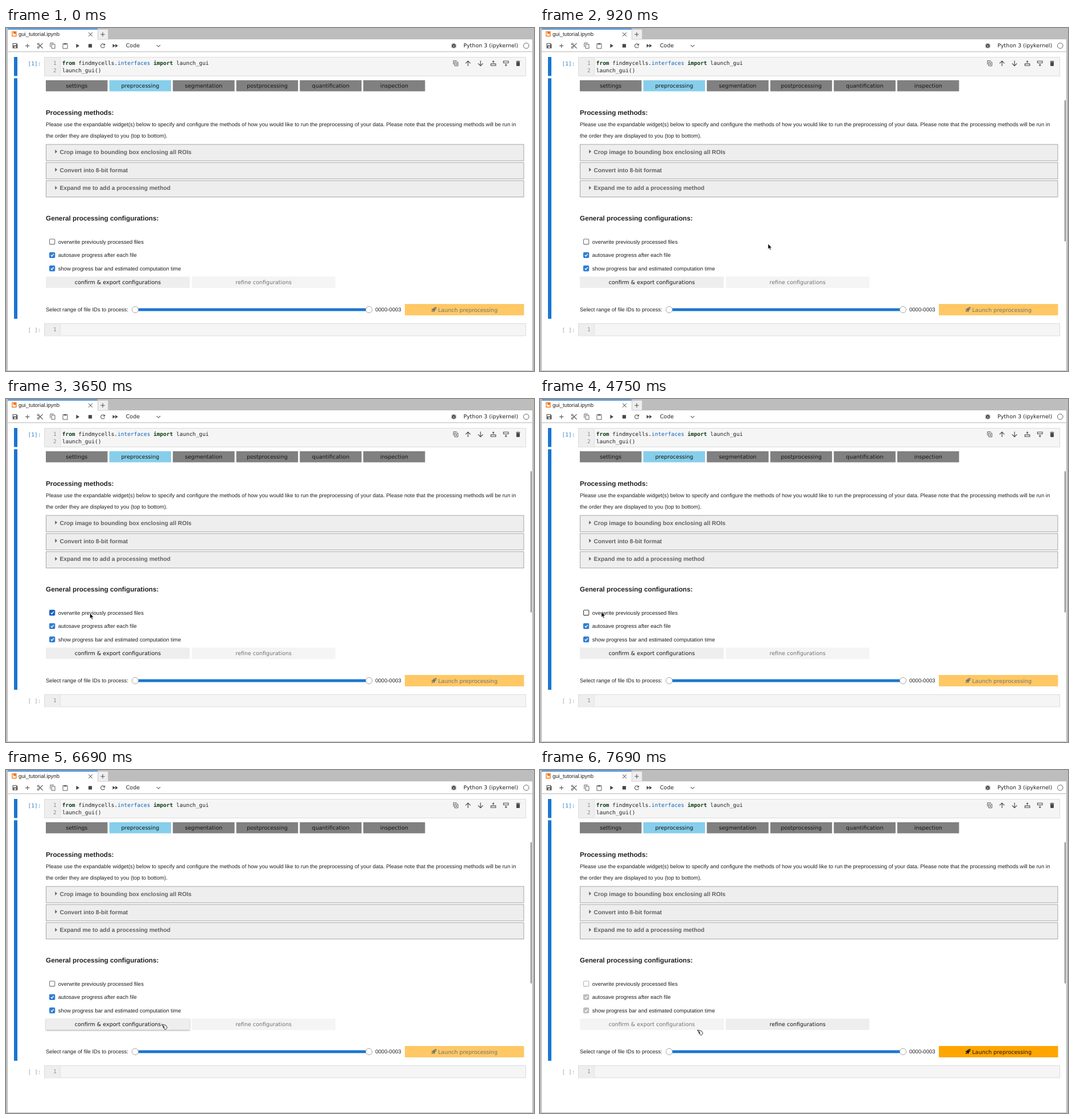
Animation of 928 by 604 pixels, one loop 8 s. Source, as an HTML page:

```html
<!DOCTYPE html>
<html lang="en">
<head>
<meta charset="utf-8">
<title>Notebook preprocessing</title>
<style>
html, body { margin: 0; width: 100%; height: 100%; overflow: hidden; background: #bdbdbd; }
svg { display: block; width: 928px; height: 604px; text-rendering: geometricPrecision; }
text { font: 9.53px "Liberation Sans", Arial, sans-serif; fill: #212121; white-space: pre; }
.ui { font-family: "DejaVu Sans", sans-serif; }
.mid { text-anchor: middle; }
.code { font-family: "DejaVu Sans Mono", monospace; }
.b10 { font-size: 10.27px; font-weight: bold; }
.b12 { font-size: 11.75px; font-weight: bold; }
.key { fill: #0b3a12; font-weight: bold; }
.lift { filter: drop-shadow(0 1px 1px rgba(0,0,0,.38)); }
.press { filter: drop-shadow(0 2px 2px rgba(0,0,0,.5)); }
</style>
</head>
<body>
<svg id="stage" viewBox="0 0 928 604" xmlns="http://www.w3.org/2000/svg"></svg>
<script>
const BLUE = '#1976d2', GREY = '#616161', DARK = '#484848';
const stage = document.getElementById('stage');

const rect = (x, y, w, h, fill, extra = '') =>
  `<rect x="${x}" y="${y}" width="${w}" height="${h}" fill="${fill}" ${extra}/>`;
const text = (x, y, str, cls = '', fill = '') =>
  `<text x="${x}" y="${y}" class="${cls}" ${fill && `style="fill:${fill}"`}>${str}</text>`;
const at = (x, y, body, extra = '') => `<g transform="translate(${x} ${y})" ${extra}>${body}</g>`;
const solid = (d, fill = GREY) => `<path d="${d}" fill="${fill}" fill-rule="evenodd"/>`;
const line = (d, color = GREY, w = 1.2) =>
  `<path d="${d}" fill="none" stroke="${color}" stroke-width="${w}"/>`;

function frame() {
  return rect(0, 0, 928, 604, '#bdbdbd')
    + rect(3, 20, 922, 583, '#fff')
    + rect(3, 1, 158, 20, '#fff') + rect(3, 1, 158, 1.6, BLUE)
    + rect(161.5, 2.5, 18, 17.5, '#eee', 'stroke="#c8c8c8" stroke-width=".8"')
    + rect(3, 41, 922, 1, '#c6c6c6') + rect(3, 42, 922, 1, '#ececec')
    + at(10, 6, line('M.9 .6H8V8.4H.9Z', '#ef6c00', 1.2) + solid('M3.2 1H7V5.2L5.1 3.8 3.2 5.2Z', '#ef6c00'))
    + text(22, 13.7, 'gui_tutorial.ipynb')
    + at(148.5, 11.3, line('M-3.4-3.4L3.4 3.4M3.4-3.4L-3.4 3.4', '#333', 1))
    + at(170, 11.3, line('M-3.7 0H3.7M0-3.7V3.7', '#555', 1.1));
}

function toolbar() {
  const icon = (x, body) => at(x, 31.3, body);
  return icon(16, solid('M-4.5-4.5H2.5L4.5-2.5V4.5H-4.5ZM-3.3-3.3V-.8H1.8V-3.3ZM0 .6a1.5 1.5 0 1 0 .01 0Z'))
    + icon(37.7, line('M-3.6 0H3.6M0-3.6V3.6'))
    + icon(60, line('M-2.2-2L4.6 4.4M-2.2 2L4.6-4.4', GREY, 1.3)
        + '<g fill="none" stroke="#616161" stroke-width="1.1"><circle cx="-3.3" cy="-3" r="1.5"/><circle cx="-3.3" cy="3" r="1.5"/></g>')
    + icon(82, line('M-1.8-2.6H4V4.7H-1.8ZM-4.2 2.4V-4.9H2', GREY, 1))
    + icon(104, line('M-4-3.8H4V4.8H-4Z', GREY, 1) + solid('M-2.4-4.2H-1.2A1.3 1.3 0 0 1 1.2-4.2H2.4V-2H-2.4Z'))
    + icon(126, solid('M-2.6-3.6L3 0-2.6 3.6Z', DARK))
    + icon(148, rect(-3.1, -3.1, 6.2, 6.2, DARK))
    + icon(170, line('M2.6-2.3A3.5 3.5 0 1 0 3.4 1', GREY, 1.2) + solid('M4.1-4.3V-.5H.3Z'))
    + icon(192, solid('M-4.5-3.2L0 0-4.5 3.2ZM.2-3.2L4.7 0 .2 3.2Z', DARK))
    + text(210.7, 34.3, 'Code', 'ui')
    + icon(268, line('M-3.2-1.3L0 1.8 3.2-1.3', GREY, 1.1))
    + icon(787, solid('M-2.2-2.2A2.3 2.3 0 0 1 2.2-2.2H4.2V-1.2H2.9V-.3H4.2V.8H2.9V1.7H4.2V2.7H2.4A2.7 2.7 0 0 1-2.4 2.7H-4.2V1.7H-2.9V.8H-4.2V-.3H-2.9V-1.2H-4.2V-2.2ZM-1.2-.9V0H1.2V-.9ZM-1.2 1.2V2.1H1.2V1.2Z', DARK)
        + line('M-2.5-4.4L-1.2-3M2.5-4.4L1.2-3', DARK, 1))
    + text(804, 34.3, 'Python 3 (ipykernel)', 'ui')
    + '<circle id="kernel" cx="914.3" cy="31.2" r="4.8" fill="#fff" stroke="#616161"/>';
}

function cell(y, h, prompt, color) {
  return rect(67.5, y, 846, h, '#f5f5f5', 'stroke="#dcdcdc"')
    + rect(68, y + .5, 27, h - 1, '#eee') + rect(95, y + .5, .8, h - 1, '#ddd')
    + text(38.5, y + 14.2, prompt, 'code', color)
    + text(83, y + 13.5, '1', 'code', '#8c8c8c');
}

function cells() {
  const icon = (x, body) => at(x, 62.3, body);
  const insert = 'M-4.3 .8H4.3V4H-4.3ZM0-.8V-5M-2-3H2';
  return rect(14, 51, 6, 33.5, BLUE) + rect(14, 88.5, 6, 423.5, BLUE)
    + cell(51.5, 33, '[1]:', '#307fc1') + cell(520.5, 21.5, '[ ]:', '#9e9e9e')
    + text(83, 77.8, '2', 'code', '#8c8c8c')
    + text(98.7, 65, '<tspan class="key">from</tspan> findmycells.<tspan fill="#0a63b5">interfaces</tspan> <tspan class="key">import</tspan> launch_gui', 'code')
    + text(98.7, 77.9, 'launch_gui()', 'code')
    + icon(790.5, line('M-1.9-2.2H3.8V4.4H-1.9ZM-4.1 2V-4.6H1.9M-.4 1.1H2.4M1-.3V2.5', DARK, .9))
    + icon(812, line('M0 4.8V-4M-4.3 0L0-4.3 4.3 0', DARK))
    + icon(834, line('M0-4.8V4M-4.3 0L0 4.3 4.3 0', DARK))
    + icon(856.5, line(insert, DARK, 1.1))
    + icon(878.7, `<g transform="scale(1 -1)">${line(insert, DARK, 1.1)}</g>`)
    + icon(900, solid('M-3.5-4H-1.5L-1-4.6H1L1.5-4H3.5V-2.9H-3.5ZM-3-2.3H3V3.4Q3 4.6 1.9 4.6H-1.9Q-3 4.6-3 3.4Z', DARK));
}

function tabs() {
  return ['settings', 'preprocessing', 'segmentation', 'postprocessing', 'quantification', 'inspection']
    .map((name, i) => {
      const x = 70 + i * 111.6, on = i === 1;
      return rect(x, 92, 108.5, 19.5, on ? '#87ceeb' : '#808080', on ? 'id="tab"' : '')
        + text(x + 54.25, 105, name, 'ui mid', '#151515');
    }).join('');
}

function methods() {
  const titles = ['Crop image to bounding box enclosing all ROIs', 'Convert into 8-bit format', 'Expand me to add a processing method'];
  const rows = titles.map((title, i) => {
    const y = 205 + i * 31.9;
    return `<g id="acc${i}" fill="#616161">` + rect(70.5, y, 839.5, 28.8, '#eee', 'stroke="#a5a5a5"')
      + `<path d="M86.3 ${y + 9.2}l3.6 3.4-3.6 3.4z"/>`
      + `<text class="b10" x="94.5" y="${y + 16.6}" style="fill:inherit">${title}</text></g>`;
  });
  return text(70, 152.8, 'Processing methods:', 'b12')
    + text(70, 173, 'Please use the expandable widget(s) below to specify and configure the methods of how you would like to run the preprocessing of your data. Please note that the processing methods will be run in')
    + text(70, 193, 'the order they are displayed to you (top to bottom).')
    + rows.join('');
}

const options = [
  { y: 376.3, end: 242, label: 'overwrite previously processed files' },
  { y: 399.8, end: 230, label: 'autosave progress after each file' },
  { y: 423.3, end: 307, label: 'show progress bar and estimated computation time' }
];

function button(id, x, y, w, h, fill, label, icon = '') {
  return `<g id="${id}">` + rect(x, y, w, h, fill)
    + text(x + w / 2 + (icon && 6), y + 13.5, label, 'ui mid', '#151515') + icon + '</g>';
}

function settings() {
  const rocket = at(747.7, 491.3, solid('M9 0C5.5 0 4 1.5 2.8 3.2L.8 3.4 0 5 1.9 5.2 3.8 7.1 4 9 5.6 8.2 5.8 6.2C7.5 5 9 3.5 9 0ZM6.6 1.6a.8.8 0 1 1-.01 0ZM.3 8.7C.3 7.2.7 6.1 1.9 6.2S2.9 7.2 2.8 7.8C2.5 8.6 1.5 8.7.3 8.7Z', '#151515'));
  const knob = x => `<circle cx="${x}" cy="496" r="5.6" fill="#fff" stroke="#a8a8a8"/>`;
  return text(70, 339, 'General processing configurations:', 'b12')
    + options.map((o, i) => `<g id="box${i}">`
        + rect(76.6, o.y - 4.6, 9.2, 9.2, '#fff', 'rx="1.3" stroke-width="1.1"')
        + `<path d="M78.8 ${o.y + .2}l1.8 1.9 3.2-4" fill="none" stroke="#fff" stroke-width="1.4"/></g>`
        + text(91.7, o.y + 3.5, o.label)).join('')
    + button('confirm', 70, 437.7, 253, 20, '#eee', 'confirm &amp; export configurations')
    + button('refine', 326.5, 437.7, 252.5, 20, '#eee', 'refine configurations')
    + text(70, 499.3, 'Select range of file IDs to process:')
    + rect(227, 493.5, 411, 5, BLUE) + knob(227) + knob(638)
    + text(649, 499.3, '0000-0003')
    + button('launch', 701, 486, 209.5, 20, '#ffa500', 'Launch preprocessing', rocket);
}

function pointers() {
  return rect(922, 127, 2, 249, '#858585', 'id="scroll" rx="1"')
    + '<path id="arrow" d="M0 0V9.3L2.1 7.4 3.6 10.9 5.1 10.2 3.6 6.9H6.5Z" fill="#000" stroke="#fff" stroke-width=".6"/>'
    + '<g id="hand" stroke="#111" stroke-width=".9" stroke-linejoin="round"><path fill="#fff" d="M.6 1.3Q1.3 .3 2.5 .9L5 2 7.6 2.4 10.4 6.6 7.3 10.2 4.6 8.1 3.3 6.5 4.4 6.2 2.6 5 3.7 4.5 2.4 3.4 3.3 3 .9 2.3Z"/><path fill="none" d="M4.4 6.2L6 6.4M3.7 4.5L5.4 4.9"/></g>';
}

stage.innerHTML = frame() + toolbar() + cells() + tabs() + methods() + settings() + pointers();
const $ = id => document.getElementById(id);
const set = (el, name, value) => el.setAttribute(name, value);

// Spans in which the screen refreshes every 100 ms; it rests in between.
const runs = [[200, 500], [820, 1120], [1330, 2130], [2230, 2430], [2850, 3050], [3250, 3350],
  [3650, 3850], [4150, 4850], [4970, 5770], [5870, 6070], [6470, 6670], [7290, 7690]];

// Pointer path: time, x, y
const path = [[200, 283, 97], [300, 390, 275], [400, 452.5, 347.5], [500, 433, 380],
  [820, 420, 380], [1120, 362.5, 380], [1330, 345, 372], [1530, 255, 342], [1730, 150, 330],
  [1930, 88, 345], [2130, 111.5, 363], [2230, 125, 363], [2430, 165, 364.5],
  [2850, 163, 368], [3050, 148.5, 379], [3350, 148.5, 376.5], [3650, 147.5, 377.3],
  [3850, 110, 389], [4150, 109.5, 387], [4550, 106, 367], [4750, 108, 375], [4850, 109, 377],
  [4970, 112, 382], [5270, 128, 408], [5570, 158, 440], [5770, 176, 446.7], [6070, 218.7, 446.7],
  [6470, 232, 446.7], [6670, 273, 447], [7490, 274, 450], [7690, 276, 457]];

function refresh(t) {
  const run = runs.filter(r => r[0] <= t).pop();
  return run ? Math.min(run[1], run[0] + Math.floor((t - run[0]) / 100) * 100) : 0;
}

function pointer(t) {
  const i = path.findIndex(p => p[0] >= t);
  if (i < 1) return path[0].slice(1);
  const a = path[i - 1], b = path[i], k = (t - a[0]) / (b[0] - a[0]);
  return [a[1] + (b[1] - a[1]) * k, a[2] + (b[2] - a[2]) * k];
}

function checkbox(i, on, over, off) {
  const [box, tick] = $('box' + i).children;
  const accent = off ? '#bdbdbd' : over ? '#1763b6' : '#2f7dd1';
  set(box, 'fill', on ? accent : '#fff');
  set(box, 'stroke', on ? accent : off ? '#b5b5b5' : over ? '#3c3c3c' : '#707070');
  set(tick, 'opacity', on ? 1 : 0);
}

function draw(time) {
  const t = refresh(time), [x, y] = pointer(t);
  const shown = t >= 200, done = t >= 7490;
  const onTab = t === 200, onConfirm = shown && x < 324 && y > 437 && y < 459;
  const hand = onTab || onConfirm;

  options.forEach((o, i) => {
    const over = shown && x < o.end && Math.abs(y - o.y) < 10;
    checkbox(i, i > 0 || t >= 3650 && t < 4650, over, done);
  });

  const open = t >= 300 && t < 500;
  set($('acc2'), 'fill', open ? '#111' : GREY);
  set($('acc2').firstChild, 'fill', open ? '#fff' : '#eee');

  set($('tab'), 'class', onTab ? 'lift' : '');
  const pressed = t >= 7290;
  const face = $('confirm').firstChild;
  set(face, 'class', done || !onConfirm ? '' : pressed ? 'press' : 'lift');
  set(face, 'fill', pressed && !done ? '#e0e0e0' : '#eee');
  set($('confirm'), 'opacity', done ? .6 : 1);
  set($('refine'), 'opacity', done ? 1 : .6);
  set($('launch'), 'opacity', done ? 1 : .6);
  set($('kernel'), 'fill', t >= 7390 && t < 7590 ? GREY : '#fff');

  set($('scroll'), 'opacity', shown ? 1 : 0);
  for (const [id, on] of [['arrow', !hand], ['hand', hand]]) {
    set($(id), 'opacity', shown && on ? 1 : 0);
    set($(id), 'transform', `translate(${x} ${y})`);
  }
}

const start = performance.now();
function tick() {
  draw((performance.now() - start) % 8000);
  requestAnimationFrame(tick);
}
tick();
</script>
</body>
</html>
```
